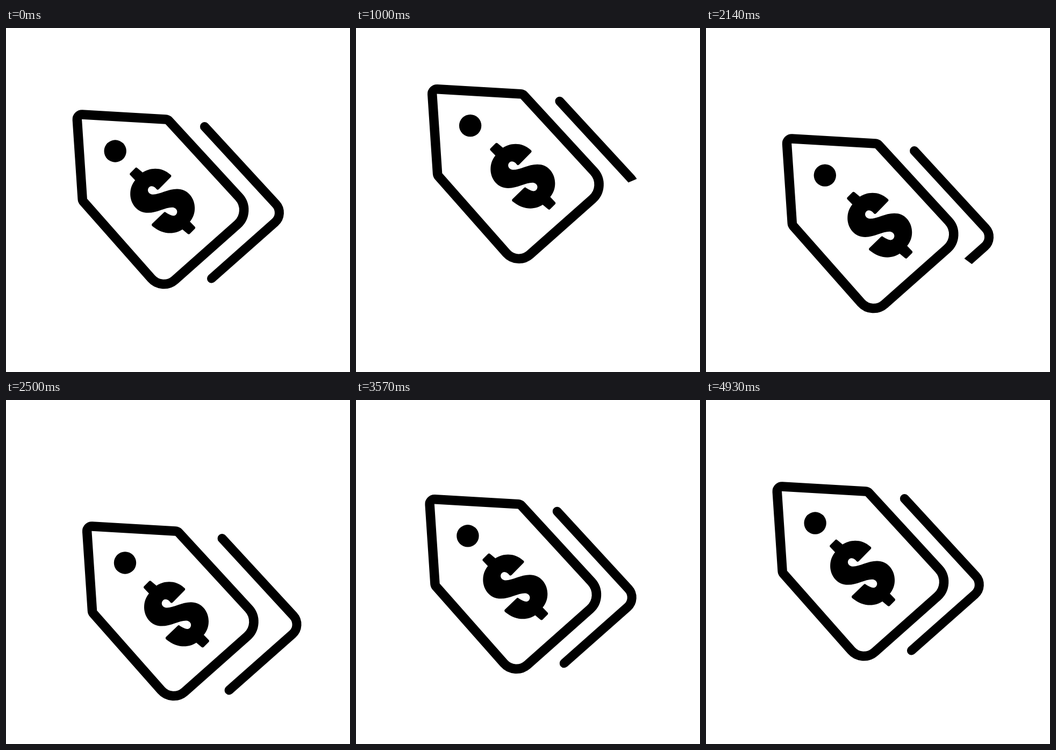
An HTML page with a canvas for the animation above (5 s loop, 640 by 640 pixels).

```html
<!DOCTYPE html>
<html lang="en">
<head>
<meta charset="utf-8">
<title>Price tag</title>
<style>
  html, body { margin: 0; width: 100%; height: 100%; overflow: hidden; background: #fff; }
  canvas { display: block; width: 640px; height: 640px; }
</style>
</head>
<body>
<canvas id="stage" width="640" height="640"></canvas>
<script>
const ctx = document.getElementById('stage').getContext('2d');
const LOOP = 5000;
const FRAMES = 70;
const STEP = LOOP / FRAMES;

const lerp = (a, b, u) => a + (b - a) * u;
const progress = (t, from, to) => Math.min(1, Math.max(0, (t - from) / (to - from)));

// Higher "soft" starts slower, higher "settle" lands slower; 1 and 1 is linear.
const ease = (u, soft = 1, settle = 1) => 1 - (1 - u ** soft) ** settle;

// Each pose says how it is reached; "bow" bends the way there sideways.
const REST = { t: 0, x: 0, y: 0 };
const tagPoses = [
  REST,
  { t: 967, x: 9, y: -50, soft: 2 },
  { t: 2525, x: 18.3, y: 76, bow: 3 },
  { ...REST, t: LOOP, soft: 1.35, settle: 3.1, bow: -1 }
];
const dollarPoses = [
  REST,
  { t: 500, x: 10, y: 6, settle: 1.5 },
  { t: 1500, x: 9.5, y: -3 },
  { t: 2140, x: 14, y: 0 },
  { t: 2860, x: 1, y: 5.5 },
  { ...REST, t: LOOP, settle: 2.5 }
];

function poseAt(poses, t) {
  const i = poses.findIndex(p => p.t > t);
  const a = poses[i - 1], b = poses[i];
  const u = progress(t, a.t, b.t);
  const e = ease(u, b.soft, b.settle);
  return [lerp(a.x, b.x, e) + (b.bow || 0) * Math.sin(Math.PI * u), lerp(a.y, b.y, e)];
}

const TOP = [369.5, 183.5], TIP = [518.7, 345.4], END = [382.5, 466];
const ARM = Math.hypot(TIP[0] - TOP[0], TIP[1] - TOP[1]);
const FULL = 412;

function chevronLength(t) {
  return t < 1530
    ? FULL * (1 - ease(progress(t, 0, 1500), 1.65))
    : FULL * progress(t, 1560, 2400);
}

// The chevron springs out to the right twice.
function hop(t) {
  return 17 * Math.sin(2 * Math.PI * progress(t, 2290, 3430)) ** 2;
}

function along(a, b, length) {
  const k = length / Math.hypot(b[0] - a[0], b[1] - a[1]);
  return [lerp(a[0], b[0], k), lerp(a[1], b[1], k)];
}

function drawTag() {
  const corners = [[131.7, 160.4, 9], [300.7, 170.2, 9], [458, 341.2, 36], [291, 489.3, 31], [142.4, 321.2, 9]];
  ctx.beginPath();
  ctx.moveTo(137, 240);
  corners.forEach(([x, y, r], i) => {
    const [nx, ny] = corners[(i + 1) % corners.length];
    ctx.arcTo(x, y, nx, ny, r);
  });
  ctx.closePath();
  ctx.stroke();
  ctx.beginPath();
  ctx.arc(203.2, 229, 20.7, 0, Math.PI * 2);
  ctx.fill();
}

// Keeps only the part above a slanted line that travels along the chevron.
function clipChevron(length) {
  const past = length - ARM;
  const [x, y] = past < 0 ? along(TOP, TIP, length) : along(TIP, END, past);
  const angle = Math.max(-47, Math.min(1.2 * past, 64 - 0.42 * past)) * Math.PI / 180;
  ctx.translate(x, y);
  ctx.rotate(angle);
  ctx.beginPath();
  ctx.rect(-900, -900, 1800, 900);
  ctx.clip();
  ctx.rotate(-angle);
  ctx.translate(-x, -y);
}

function drawChevron(length) {
  if (length <= 0) return;
  ctx.save();
  if (length < FULL) clipChevron(length);
  ctx.beginPath();
  ctx.moveTo(...TOP);
  ctx.arcTo(...TIP, ...END, 24);
  ctx.lineTo(...END);
  ctx.stroke();
  ctx.restore();
}

// One half of the sign; "reach" lengthens its open end.
function halfDollar(reach) {
  ctx.lineTo(-51, -38.5);
  ctx.arcTo(-62, -50, -49, -63, 3);
  ctx.arcTo(-49, -63, -37, -53, 3);
  ctx.lineTo(-37, -53);
  ctx.bezierCurveTo(-24, -62, -2, -64, 14 + reach, -49.5 + reach / 2);
  ctx.arcTo(17.5 + reach, -46.5 + reach / 3, -6 + reach, -23, 3);
  ctx.arcTo(-9 + reach, -19.5, -12 + reach, -23, 3);
  ctx.bezierCurveTo(-15, -27, -21, -30, -25.5, -25);
  ctx.bezierCurveTo(-30, -19, -25, -12, -18, -12);
  ctx.bezierCurveTo(-3, -12, 14, -25, 34, -21.5);
  ctx.bezierCurveTo(50, -18, 60, -3, 60, 13);
  ctx.bezierCurveTo(60, 23, 57, 31, 51, 38.5);
}

function drawDollar() {
  ctx.beginPath();
  halfDollar(0);
  ctx.rotate(Math.PI);
  halfDollar(4.5);
  ctx.closePath();
  ctx.fill();
}

function render(t) {
  ctx.fillStyle = '#fff';
  ctx.fillRect(0, 0, 640, 640);
  ctx.fillStyle = ctx.strokeStyle = '#000';
  ctx.lineCap = ctx.lineJoin = 'round';
  ctx.save();
  ctx.translate(...poseAt(tagPoses, t));
  ctx.lineWidth = 17.5;
  drawTag();

  ctx.save();
  ctx.translate(291.2, 321.7);
  ctx.translate(...poseAt(dollarPoses, t));
  drawDollar();
  ctx.restore();

  ctx.translate(hop(t), 0);
  ctx.lineWidth = 17;
  drawChevron(chevronLength(t));
  ctx.restore();
}

function tick() {
  const t = performance.now() % LOOP;
  render(Math.floor((t + 5) / STEP) % FRAMES * STEP);
  requestAnimationFrame(tick);
}
tick();
</script>
</body>
</html>
```
